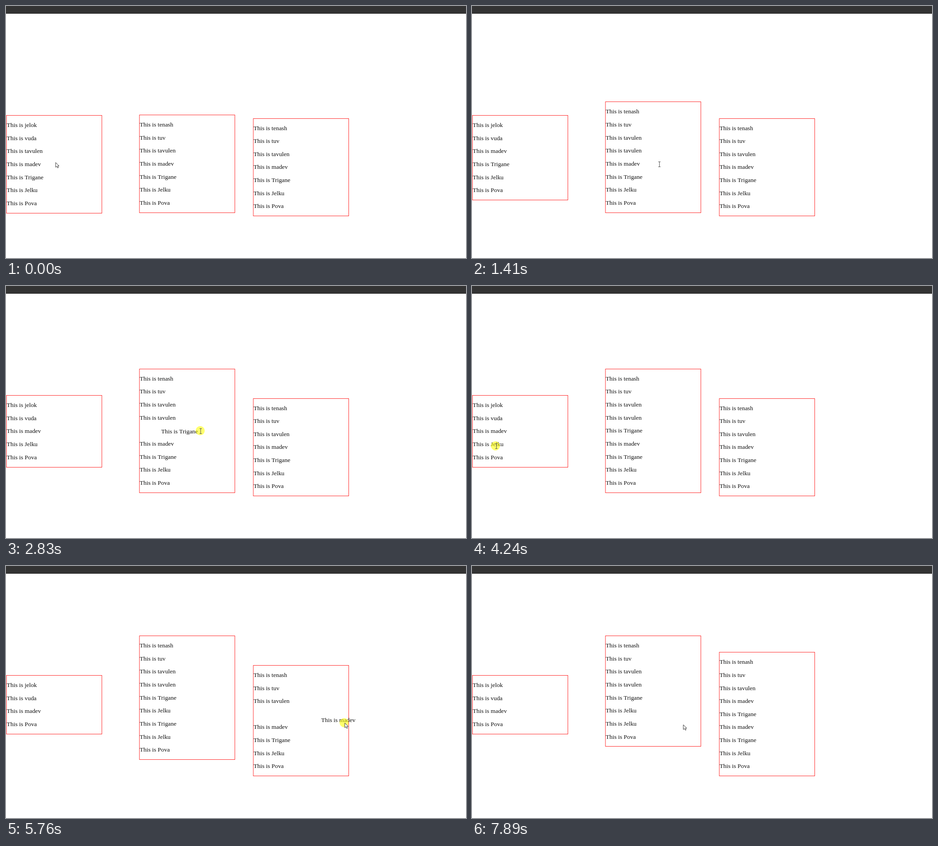
These frames come from a looping animation (1010 px wide and 554 px high, 8000 ms). An HTML page with a canvas:

```html
<!DOCTYPE html>
<html lang="en">
<head>
<meta charset="utf-8">
<title>Drag between lists</title>
<style>
html, body { margin: 0; width: 100%; height: 100%; overflow: hidden; background: #fff; }
canvas { display: block; }
</style>
</head>
<body>
<canvas width="1010" height="554"></canvas>
<script>
const ctx = document.querySelector('canvas').getContext('2d');
const LOOP = 8000, PITCH = 28.63, WIDTH = 211;
const rest = ['tavulen', 'madev', 'Trigane', 'Jelku', 'Pova'];
const makeBoxes = () => [
  { x: 0, top: 240.2, items: ['jelok', 'vuda', ...rest] },
  { x: 292, top: 239, items: ['tenash', 'tuv', ...rest] },
  { x: 542, top: 246.5, items: ['tenash', 'tuv', ...rest] }
];

const smooth = u => u * u * (3 - 2 * u);
const easeOut = power => u => 1 - (1 - u) ** power;

// The pointer goes to `to` in n visible steps, on a path that sags by `sag`.
const move = (at, end, n, to, sag) => ({ on: at, at, end, n, to, sag, ease: smooth });
// A drag is pressed at `on`; src and dst are [box, index].
const drag = (on, at, end, n, to, sag, ease, src, dst) => ({ on, at, end, n, to, sag, ease, src, dst });

const acts = [
  move(70, 410, 5, [61, 326], 0),
  drag(680, 830, 1410, 9, [411, 348], 3, smooth, [0, 2], [1, 3]),
  move(1660, 2200, 8, [67, 347], 8),
  drag(2400, 2600, 3020, 7, [436, 338], -20, easeOut(4.5), [0, 3], [1, 4]),
  move(3410, 4040, 10, [53, 352], 25),
  drag(4240, 4320, 4640, 5, [341.5, 345], 0, easeOut(2), [0, 3], [1, 5]),
  move(5000, 5140, 3, [341.5, 353], 0),
  drag(5400, 5600, 5900, 5, [744, 345], 0, easeOut(9), [1, 6], [2, 3]),
  move(6100, 6730, 10, [357, 344], 16),
  drag(6930, 7130, 7420, 5, [711, 354], -9, easeOut(1.8), [1, 6], [2, 4]),
  move(7750, 7890, 3, [464, 349], 4)
];
// Each act starts where the one before it ended.
acts.reduce((from, a) => (a.from = from, a.to), [109, 344]);

const stepOf = (a, t) => t < a.at ? 0
  : Math.min(a.n, 1 + Math.floor((t - a.at) / (a.end - a.at) * (a.n - 1) + 1e-6));

function pointAt(a, k) {
  const u = k / a.n, s = a.ease(u);
  const mix = i => a.from[i] + (a.to[i] - a.from[i]) * s;
  return [mix(0), mix(1) + a.sag * 4 * u * (1 - u)];
}

const textX = box => box.x + 1.6;
const textY = (box, i) => Math.round(box.top + 26 + i * PITCH);

function stateAt(t) {
  const boxes = makeBoxes();
  let cursor = acts[0].from, held = null;
  for (const a of acts) {
    if (t < a.on) break;
    const k = stepOf(a, t);
    cursor = pointAt(a, k);
    if (!a.src) continue;
    const [b, i] = a.src, [c, j] = a.dst;
    const src = boxes[b], dst = boxes[c], name = src.items[i];
    // The dragged line trails the pointer by one step.
    const [px, py] = pointAt(a, Math.max(0, k - 1));
    const x = textX(src) + px - a.from[0];
    const y = textY(src, i) + py - a.from[1];
    held = k < a.n ? { name, x, y } : null;
    const slot = held ? null : name;
    if (!held || x + 40 > dst.x) {
      src.items.splice(i, 1);
      dst.items.splice(j, 0, slot);
      dst.top -= PITCH;
    } else src.items[i] = slot;
  }
  return { boxes, cursor, held };
}

function drawName(name, x, y) {
  ctx.fillStyle = '#111';
  ctx.fillText('This is ' + name, x, y);
}

function drawBox(box) {
  const top = Math.round(box.top);
  const bottom = Math.round(box.top + box.items.length * PITCH + 14.3);
  ctx.strokeStyle = '#ff2a2a';
  ctx.lineWidth = 1;
  ctx.strokeRect(box.x + 1, top + 0.5, WIDTH - 1.5, bottom - top);
  box.items.forEach((name, i) => name && drawName(name, textX(box), textY(box, i)));
}

function drawArrow(x, y) {
  const p = new Path2D('M0 0V10.5L2.5 8.3L4.3 12L6.1 11.2L4.5 7.6H7.4Z');
  ctx.save();
  ctx.translate(x, y);
  ctx.fillStyle = '#fff';
  ctx.strokeStyle = '#222';
  ctx.lineWidth = 0.9;
  ctx.fill(p);
  ctx.stroke(p);
  ctx.restore();
}

function drawBeam(x, y) {
  ctx.save();
  ctx.translate(Math.floor(x) + 0.5, Math.round(y));
  ctx.strokeStyle = '#555';
  ctx.lineWidth = 1;
  ctx.stroke(new Path2D('M-2.5 -5.5H2.5M-2.5 5.5H2.5M0 -5.5V5.5'));
  ctx.restore();
}

function draw(t) {
  const { boxes, cursor: [x, y], held } = stateAt(t);
  ctx.fillStyle = '#fff';
  ctx.fillRect(0, 0, 1010, 554);
  ctx.fillStyle = '#333';
  ctx.fillRect(0, 0, 1010, 17);
  ctx.font = '13.4px "Liberation Serif", "Times New Roman", serif';
  boxes.forEach(drawBox);
  if (held) {
    drawName(held.name, held.x, held.y);
    ctx.fillStyle = 'rgba(255,255,0,.57)';
    ctx.beginPath();
    ctx.arc(x - 1.5, y - 0.5, 10, 0, 7);
    ctx.fill();
  }
  const outside = (x > 211 && x < 292) || (x > 503 && x < 542) || x > 740;
  if (outside || t < 200 || t >= 7750) drawArrow(x, y);
  else drawBeam(x, y);
}

function tick() {
  draw(performance.now() % LOOP);
  requestAnimationFrame(tick);
}
tick();
</script>
</body>
</html>
```
